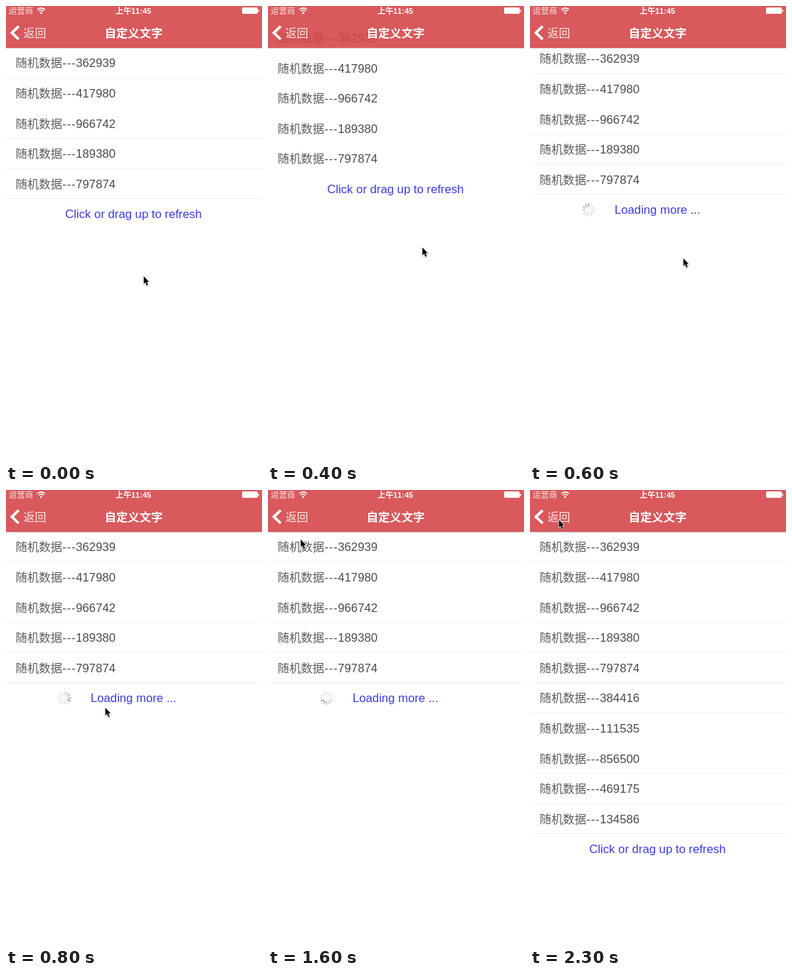
Recreate the animation shown at these times as an HTML page with a canvas. Size 360x643 px, loop 2.4 s.

```html
<!DOCTYPE html>
<html lang="zh-CN">
<head>
<meta charset="utf-8">
<style>
html, body { margin: 0; width: 100%; height: 100%; overflow: hidden; background: #fff; }
canvas { display: block; }
</style>
</head>
<body>
<canvas id="stage" width="360" height="643"></canvas>
<script>
const ctx = document.getElementById('stage').getContext('2d');
const LATIN = '"Liberation Sans", Arial, sans-serif';
const CJK = '"Noto Sans CJK SC", "Noto Sans CJK", sans-serif';
const STEP = 100, STEPS = 24, TOP = 58.8, ROW = 42.6;
const DRAG_START = 1, DRAG_END = 4, SETTLED = 8, LOADED = 22;
const labels = '362939 417980 966742 189380 797874 384416 111535 856500 469175 134586'.split(' ');
ctx.fontKerning = 'none';

// Pointer stops: step, x, y
const stops = [[1, 193, 380], [3, 180, 300], [5, 253, 379], [8, 139, 306],
  [13, 50, 85], [20, 39, 47], [23, 40, 41]];

function pointerAt(step) {
  const i = Math.max(1, stops.findIndex(s => s[0] >= step));
  const [s0, x0, y0] = stops[i - 1], [s1, x1, y1] = stops[i];
  const p = Math.max(0, (step - s0) / (s1 - s0));
  return [x0 + (x1 - x0) * p, y0 + (y1 - y0) * p];
}

// Rubber-band pull, then exponential return
function scrollAt(step) {
  if (step <= DRAG_START || step >= SETTLED) return 0;
  const p = Math.min(1, (step - DRAG_START) / (DRAG_END - DRAG_START));
  const pull = -35.4 * (1 - (1 - p) ** 2);
  return step > DRAG_END ? pull * 0.41 ** (step - DRAG_END) : pull;
}

function text(str, x, y, font, color, align = 'left') {
  ctx.font = font;
  ctx.fillStyle = color;
  ctx.textAlign = align;
  ctx.fillText(str, x, y);
}

function polygon(points, close) {
  ctx.beginPath();
  points.forEach(([x, y]) => ctx.lineTo(x, y));
  if (close) ctx.closePath();
}

function drawSpinner(x, y, head) {
  ctx.lineWidth = 1.4;
  ctx.lineCap = 'round';
  for (let i = 0; i < 12; i++) {
    const age = ((head - i) % 12 + 12) % 12;
    const a = i * Math.PI / 6, s = Math.sin(a), c = -Math.cos(a);
    const shade = Math.min(224, 146 + age * 16);
    ctx.strokeStyle = `rgb(${shade},${shade},${shade})`;
    polygon([[x + s * 5, y + c * 5], [x + s * 8.8, y + c * 8.8]]);
    ctx.stroke();
  }
}

function drawList(step) {
  const count = step < LOADED ? 5 : 10;
  const dragging = step > DRAG_START && step <= DRAG_END;
  const top = TOP + scrollAt(step);
  for (let i = 0; i < count; i++) {
    const y = top + ROW * i, base = y + 27.5;
    text('随机数据', 13.5, base, `300 16.4px ${CJK}`, '#5c5c5c');
    for (let d = 0; d < 3; d++) text('-', 79.3 + d * 6.4, base, `16.7px ${LATIN}`, '#555');
    text(labels[i], 98.3, base, `16.7px ${LATIN}`, '#4a4a4a');
    // Hairlines that land on a pixel edge drop out
    const line = y + ROW, edge = Math.abs(line - Math.round(line));
    if (!dragging && edge > 0.15) {
      ctx.fillStyle = '#f1f1f1';
      ctx.fillRect(0, Math.floor(line), 360, 1);
    }
  }
  const mid = top + ROW * (count + 0.5);
  const loading = step > DRAG_END && step < LOADED;
  text(loading ? 'Loading more ...' : 'Click or drag up to refresh',
    179.3, mid + 6, `16.7px ${LATIN}`, '#3c3ce2', 'center');
  if (loading) drawSpinner(82.5, mid + 0.3, 4 + 2 * (step - SETTLED));
}

function drawBar() {
  ctx.fillStyle = 'rgba(213,71,75,.9)';
  ctx.fillRect(0, 0, 360, 59);
  ctx.fillStyle = 'rgba(0,0,0,.2)';
  ctx.fillRect(0, 59, 360, 1);
  const soft = 'rgba(255,255,255,.85)';
  text('运营商', 3.8, 11, `300 11.5px ${CJK}`, soft);
  text('返回', 24.5, 44, `16px ${CJK}`, soft);
  text('自定义文字', 179.5, 44, `bold 16.3px ${CJK}`, '#fff', 'center');
  text('上午', 154, 11, `bold 11.2px ${CJK}`, '#fff');
  text('11:45', 176, 11, `bold 11px ${LATIN}`, '#fff');

  ctx.strokeStyle = '#fff';
  ctx.lineCap = 'butt';
  ctx.beginPath();
  ctx.arc(49.5, 10, 1.4, 0, 7);
  ctx.fill();
  ctx.lineWidth = 1.6;
  for (const r of [4.4, 7.6]) {
    ctx.beginPath();
    ctx.arc(49.5, 10.5, r, -Math.PI * 0.76, -Math.PI * 0.24);
    ctx.stroke();
  }

  ctx.beginPath();
  ctx.roundRect(332, 2, 22, 9, 1.5);
  ctx.roundRect(354.5, 5, 1.5, 3.5, 0.7);
  ctx.fill();

  ctx.lineWidth = 3.8;
  polygon([[17.8, 28.5], [8.3, 37.8], [17.8, 47]]);
  ctx.stroke();
}

function drawPointer(x, y) {
  ctx.save();
  ctx.translate(x + 0.7, y + 1);
  ctx.scale(0.86, 0.9);
  polygon([[0, 0], [0, 12], [2.8, 9.6], [4.8, 14.4], [7, 13.5], [5, 8.9], [8.6, 8.9]], true);
  ctx.shadowColor = 'rgba(0,0,0,.35)';
  ctx.shadowBlur = 2;
  ctx.shadowOffsetY = 1;
  ctx.lineWidth = 1.6;
  ctx.lineJoin = 'round';
  ctx.strokeStyle = '#fff';
  ctx.stroke();
  ctx.shadowColor = 'transparent';
  ctx.fillStyle = '#000';
  ctx.fill();
  ctx.restore();
}

const start = performance.now();
function render() {
  const step = Math.floor((performance.now() - start) / STEP) % STEPS;
  ctx.fillStyle = '#fff';
  ctx.fillRect(0, 0, 360, 643);
  drawList(step);
  drawBar();
  drawPointer(...pointerAt(step));
  requestAnimationFrame(render);
}
render();
</script>
</body>
</html>
```
